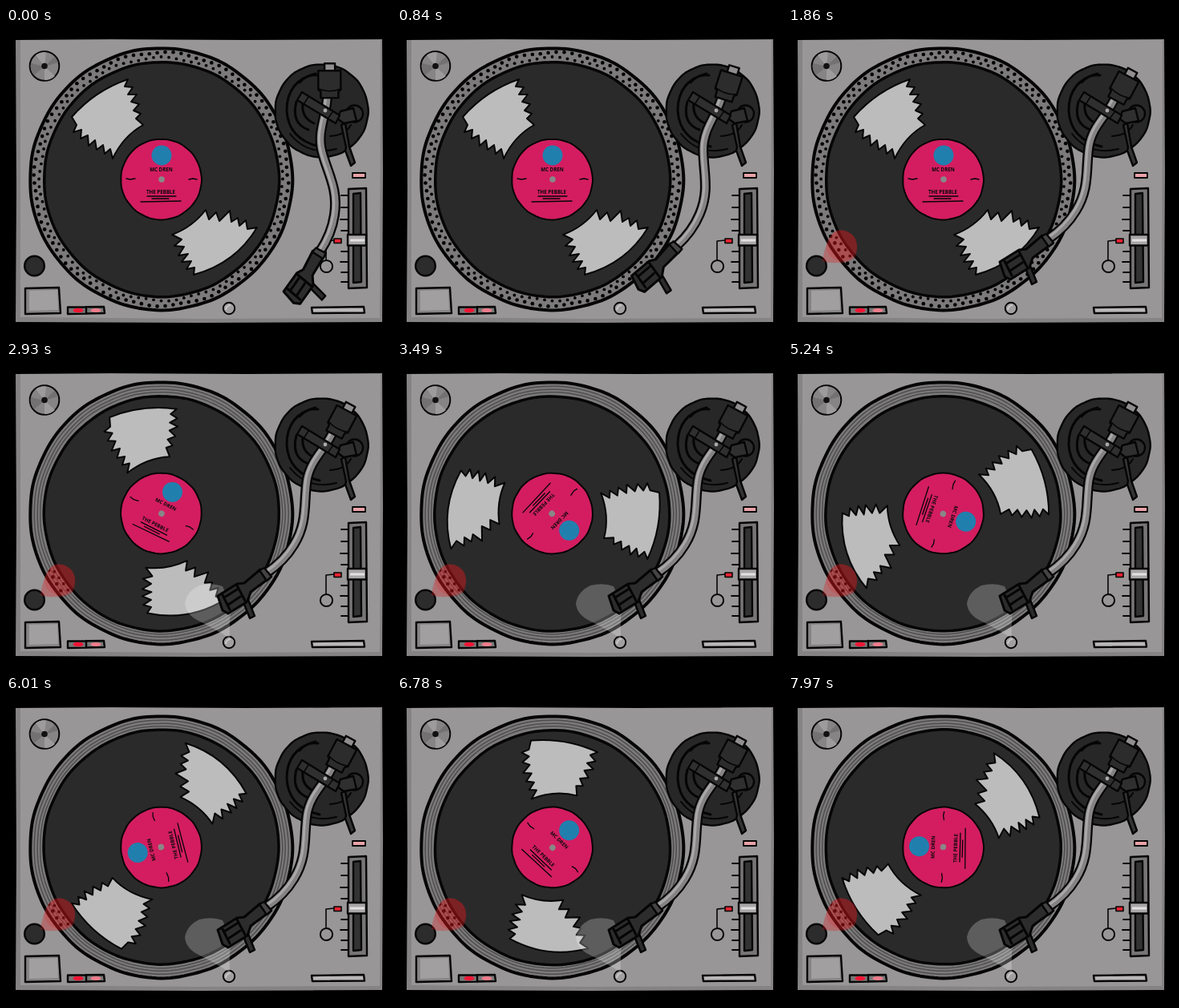
Recreate the animation shown at these times as an HTML page. Size 480x382 px, loop 8 s.

```html
<!DOCTYPE html>
<html lang="en">
<head>
<meta charset="utf-8">
<title>Turntable</title>
<style>
  html, body { margin: 0; width: 100%; height: 100%; overflow: hidden; background: #000; }
  svg { display: block; width: 100vw; height: 100vh; }
  .ink { stroke: #050505; stroke-width: 2.4; stroke-linejoin: round; stroke-linecap: round; }
  .line { fill: none; }
  .dark { fill: #2d2c2c; }
  text { font: bold 6.2px "Open Sans", sans-serif; text-anchor: middle; fill: #090909; }
</style>
</head>
<body>
<svg viewBox="0 0 480 382">
  <defs>
    <path id="lampShape" d="M43 291 Q45 273 54 259 Q58 252 66 252 Q78 253 84 263 Q89 275 83 287 Q74 294 62 293 Q52 294 43 291Z"/>
    <clipPath id="lampClip"><use href="#lampShape"/></clipPath>
    <path id="tube" d="M409 84 C400 108 379 121 375 149 C371 178 376 200 359 228 C350 243 340 253 325 263"/>
  </defs>

  <!-- chassis -->
  <path fill="#858383" d="M12 15 L130 14 L300 15 L469 14 L470 180 L469 367 L240 368 L12 367 L13 200Z"/>
  <path fill="#989696" d="M18 15 L467 15 L466 362 L240 363 L18 361Z"/>

  <!-- adapter and left-hand controls -->
  <circle class="ink" cx="48" cy="47.5" r="18.3" fill="#868484" style="stroke-width:2"/>
  <path fill="#9d9b9b" d="M48 48 L37 34 A17.5 17.5 0 0 1 50 30.5Z M48 48 L61 60 A17.5 17.5 0 0 1 48 65Z"/>
  <path fill="#737171" d="M48 48 L31 44 A17 17 0 0 0 35 59Z M48 48 L65 43 A17 17 0 0 0 60 36Z"/>
  <circle cx="48" cy="47.5" r="3.8" fill="#111"/>
  <circle class="ink dark" cx="35.5" cy="297" r="12.3"/>
  <path class="ink" fill="#858383" d="M24 325 L66 324 L68 356 L24 357Z"/>
  <path fill="#a19f9f" d="M29 328 L64 327 L65 352 L29 353Z"/>
  <path class="ink" fill="#777" d="M77 348.5 L122 348 L123 356 L77 357Z M100 348 V357"/>
  <ellipse cx="90" cy="352.5" rx="6.5" ry="2.8" fill="#f01736"/>
  <ellipse cx="112" cy="352.5" rx="6.5" ry="2.6" fill="#ef7c8b"/>
  <circle class="ink" cx="278" cy="350" r="7.2" fill="#a19f9f" style="stroke-width:2"/>
  <path d="M274 352 Q275 346 280 346" fill="none" stroke="#c8c6c6" stroke-width="2"/>

  <!-- platter -->
  <path class="ink" id="platter" fill="#7c7a7a" style="stroke-width:4"/>
  <g id="stripes" fill="none" stroke="#4f4e4e" stroke-width="1.5"></g>
  <g id="dots"></g>

  <!-- record -->
  <g id="record">
    <path class="ink" id="vinyl" fill="#2b2a2a" style="stroke-width:3.5"/>
    <g class="ink" fill="#bdbcbc" style="stroke-width:2">
      <path d="M82 111 Q111 78 152 64 L148 73 L158 74 L152 83 L163 83 L156 92 L166 95 L159 103 L168 107 L162 113 L171 121
        Q146 135 133 163 L130 151 L123 157 L121 146 L113 152 L111 140 L103 147 L102 134 L93 138 L94 127 L84 130 L88 121Z"/>
      <path d="M207 258 Q232 249 249 227 L253 239 L262 230 L266 241 L279 228 L281 242 L289 237 L291 247 L299 240 L301 251 L313 249
        Q286 294 234 308 L235 299 L225 301 L231 291 L219 292 L227 282 L215 284 L222 273 L210 272 L219 264Z"/>
    </g>
    <path class="ink" id="label" fill="#d31d60" style="stroke-width:2"/>
    <circle cx="194" cy="159" r="12.5" fill="#217fae"/>
    <text x="193.5" y="178.5">MC DREN</text>
    <text x="193" y="206.5">THE PEBBLE</text>
    <path class="ink line" style="stroke-width:1.3" d="M150 188 L155 189 L161 188 M228 189 L233 188 L238 189 M176 210 L212 210 M182 213 L203 213 M168 217 L218 216"/>
    <circle cx="194" cy="189" r="3.8" fill="#898787"/>
  </g>

  <!-- pitch control -->
  <path class="ink" fill="#e9a2a7" style="stroke-width:1.8" d="M432 181 H448 V187 H432Z"/>
  <path class="ink line" style="stroke-width:1.8" d="M418 209 H427 M418 224 H427 M417 239 H427 M418 253 H427 M418 279 H427 M417 292 H427 M418 305 H427 M418 317 H427"/>
  <path class="ink" fill="#777575" d="M427 201 L449 200 L450 324 L427 325Z"/>
  <path class="ink" fill="#343333" d="M433 207 L442 206 L443 317 L433 318Z"/>
  <path class="ink" fill="#a9a7a7" d="M426 258 H449 V271.5 H426Z"/>
  <path stroke="#e2e0e0" stroke-width="3" d="M429 265 H447"/>
  <path class="ink" fill="#b9b7b7" d="M381 349 L446 348 L447 355.5 L382 356Z"/>
  <path class="ink line" style="stroke-width:1.6" d="M409 265 L399 266 L399 289"/>
  <path class="ink" fill="#e52232" style="stroke-width:1.6" d="M409 263 H418 V268.5 H409Z"/>
  <circle class="ink" cx="399.5" cy="297.5" r="7.6" fill="#989696" style="stroke-width:2"/>

  <!-- tonearm base -->
  <path class="ink" id="base" fill="#282727"/>
  <path class="ink line" style="stroke-width:3" d="M386 57 Q350 66 350 103 Q352 139 391 148 M362 92 Q355 119 377 127 M370 94 Q368 112 384 119 M366 68 Q375 57 389 59"/>
  <path class="ink line" style="stroke-width:2" d="M354 132 Q376 160 412 151 M404 135 Q423 134 430 121"/>
  <path class="ink" fill="#353434" d="M418 121 L423 119 L428 148 L435 168 L430 172 L423 153 L424 149Z"/>
  <circle class="ink" cx="434.5" cy="107" r="10.5" fill="#2d2c2c"/>
  <path class="ink" fill="#302f2f" d="M417 104 L433 100 L437 116 L421 119 L413 113Z"/>

  <!-- lights -->
  <g id="lamp" fill="#e0191f">
    <use href="#lampShape" fill-opacity=".32"/>
    <circle cx="67" cy="272" r="19" fill-opacity=".18"/>
  </g>
  <path id="glow" fill="#fff" fill-opacity=".24" d="M223 301 Q226 286 241 279 Q257 275 270 280 L281 305 Q278 320 279 345 Q255 330 240 323 Q224 315 223 301Z"/>

  <!-- tonearm, drawn in its playing position -->
  <g id="arm">
    <g class="line">
      <use href="#tube" stroke="#060606" stroke-width="13"/>
      <use href="#tube" stroke="#858383" stroke-width="8.5"/>
      <use href="#tube" stroke="#aaa8a8" stroke-width="3" x="-1.5" y="-1"/>
    </g>
    <g id="weight">
      <g transform="translate(416.5 76.5) rotate(28)">
        <path class="ink" fill="#908e8e" d="M-6 -27 H7 V-15 H-6Z"/>
        <path class="ink dark" d="M-14 -18 L14 -18 L14 6 L11 8 L11 16 L-11 16 L-11 8 L-14 6Z"/>
        <path class="ink line" style="stroke-width:1.6" d="M-13 5 Q0 10 14 5"/>
      </g>
    </g>
    <path class="ink" fill="#2d2c2c" d="M296 300 L302 297 L310 317 L304 320Z"/>
    <path class="ink" fill="#2d2c2c" style="stroke-width:3" d="M264 292 L288 277 L297 276 L317 259 L328 270 L305 287 L301 299 L277 314 L270 310Z"/>
    <path class="ink" fill="#454343" d="M316 260 L322 257 L331 268 L325 273Z"/>
    <path class="ink line" style="stroke-width:3" d="M272 294 L288 284 M277 303 L292 293 M288 279 L298 298 M270 291 L279 309"/>
  </g>
  <path class="ink" fill="#302f2f" d="M369 80 L416 109 L411 119 L363 90Z"/>
  <path class="ink line" style="stroke-width:1.5" d="M377 86 L372 94 M407 105 L402 112"/>
  <circle cx="398" cy="103" r="2.4" fill="#aaa8a8"/>
</svg>
<script>
const el = id => document.getElementById(id);
const LOOP = 8000, STEP = 70, ARM_STEPS = 19;
const LAMP_ON = 1860, GLOW_ON = 2260, SPIN_ON = 2790, SPIN_DEG = 13.4;

// Closed circle with a slightly uneven, hand-drawn edge
function roughCircle(cx, cy, r, wobble) {
  const points = Array.from({ length: 180 }, (_, i) => {
    const a = i * Math.PI / 90;
    const d = r + wobble * (Math.sin(a * 5) + Math.sin(a * 11 + 2) + Math.sin(a * 17 + 1)) / 2;
    return (cx + d * Math.cos(a)).toFixed(2) + ' ' + (cy + d * Math.sin(a)).toFixed(2);
  });
  return 'M' + points.join('L') + 'Z';
}

el('platter').setAttribute('d', roughCircle(193.5, 188.5, 163.5, 0.4));
el('vinyl').setAttribute('d', roughCircle(194, 189, 146.5, 0.3));
el('label').setAttribute('d', roughCircle(193.5, 189, 50.3, 0.2));
el('base').setAttribute('d', roughCircle(393.5, 103.3, 58, 0.3));
el('stripes').innerHTML = [151, 154.5, 158.5].map(r => `<path d="${roughCircle(193.5, 188.5, r, 0.3)}"/>`).join('');

const DOTS_PER_ROW = 100;
let dots = '';
[[151.5, 1.9], [158, 2.3]].forEach(([r, size], row) => {
  for (let i = 0; i < DOTS_PER_ROW; i++) {
    const a = (i + row / 2) * 2 * Math.PI / DOTS_PER_ROW;
    const d = r + Math.sin(i * 5.3 + row);
    dots += `<circle cx="${193.5 + d * Math.cos(a)}" cy="${188.5 + d * Math.sin(a)}" r="${size}"/>`;
  }
});
el('dots').innerHTML = dots;

const show = (id, on) => el(id).setAttribute('visibility', on ? 'visible' : 'hidden');
const turn = (id, deg, x, y) => el(id).setAttribute('transform', `rotate(${deg} ${x} ${y})`);

function draw(t) {
  const back = 1 - Math.min(Math.floor(t / STEP), ARM_STEPS) / ARM_STEPS;
  turn('arm', -22.5 * back, 398, 104);
  turn('weight', -6 * back, 409, 86);

  const spinning = t >= SPIN_ON;
  turn('record', spinning ? Math.floor((t - SPIN_ON) / STEP) * SPIN_DEG : 0, 193.5, 189);
  show('stripes', spinning);
  // While spinning, the strobe lamp freezes the dots it lights
  if (spinning) el('dots').setAttribute('clip-path', 'url(#lampClip)');
  else el('dots').removeAttribute('clip-path');
  show('lamp', t >= LAMP_ON);
  show('glow', t >= GLOW_ON);
}

const start = performance.now();
function tick() {
  draw((performance.now() - start) % LOOP);
  requestAnimationFrame(tick);
}
tick();
</script>
</body>
</html>
```
